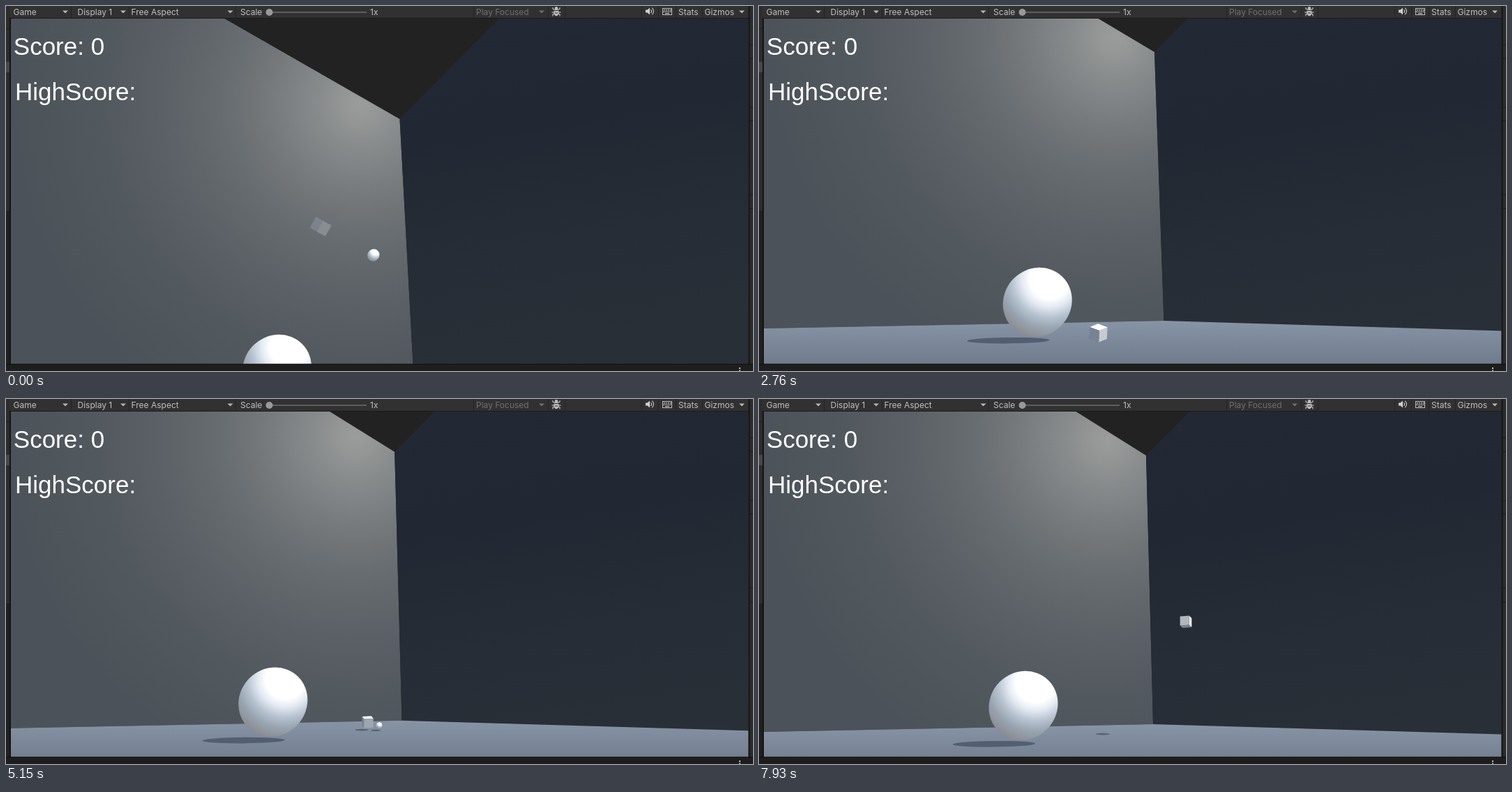
An HTML page with a canvas that plays this animation: 1071 by 523 pixels, repeating every 8 s.

```html
<!DOCTYPE html>
<html lang="en">
<head>
<meta charset="utf-8">
<title>Game view</title>
<style>
  html, body { margin: 0; width: 100%; height: 100%; overflow: hidden; background: #191919; }
  canvas { display: block; }
</style>
</head>
<body>
<canvas id="view" width="1071" height="523"></canvas>
<script>
const g = document.getElementById('view').getContext('2d');
const LOOP = 8000, TAU = Math.PI * 2;
const LEFT = 7, TOP = 18, RIGHT = 1064.5, BOTTOM = 512.5;

// Moments when the game stands still: start, length
const pauses = [[2360, 400], [4350, 730], [6960, 200]];

// Cube path in game time: t, x, y
const path = [
  [0, 451, 316], [850, 525, 357], [1650, 496, 505], [2070, 491, 509], [2360, 486.5, 468.5],
  [3160, 515.5, 471], [3950, 515.5, 471], [4790, 552, 375.3], [5830, 583, 246], [6600, 612, 319.3]
];

// Pickups in game time: appear, vanish, x, y, radius
const pickups = [
  [0, 850, 526.8, 357, 8.8],
  [2900, 4120, 534.8, 467.8, 4.6],
  [4120, 5900, 582.8, 235.8, 7.3]
];

const ramp = (t, a, b) => Math.min(1, Math.max(0, (t - a) / (b - a)));
const gameTime = t => t - pauses.reduce((sum, [start, len]) => sum + len * ramp(t, start, start + len), 0);

function along(points, t) {
  const i = points.findIndex(p => p[0] > t);
  const [a, b] = i < 0 ? points.slice(-2) : points.slice(i - 1, i + 1);
  const f = ramp(t, a[0], b[0]);
  return [a[1] + (b[1] - a[1]) * f, a[2] + (b[2] - a[2]) * f];
}

// The room follows from the upper corner, which moves with the camera
function roomAt(t) {
  const lift = ramp(t, 1650, 2360), drift = ramp(t, 2360, 3160), settle = ramp(t, 3950, 4470);
  const x = 564.5 + 2.5 * lift + 4 * Math.sin(Math.PI * lift) - 9.5 * drift - 2.5 * settle;
  const y = 162 - 96 * lift + 9 * drift + 6 * settle;
  const pan = x - 555, tilt = y - 81, depth = y - TOP;
  return {
    x, y,
    left: x - depth * (1.54 + 0.0009 * depth + 0.008 * pan),
    right: x + depth * 0.99,
    floorX: x + 10 + 0.09 * tilt + 0.4 * pan,
    floorY: y + 385 + 0.06 * Math.max(0, tilt),
    ballX: x - 176 + 0.6 * pan - 0.07 * tilt,
    ballY: y + 358.3
  };
}

function poly(fill, ...pts) {
  g.fillStyle = fill;
  g.beginPath();
  pts.forEach(p => g.lineTo(p[0], p[1]));
  g.closePath();
  g.fill();
}

function rect(fill, x, y, w, h) {
  g.fillStyle = fill;
  g.fillRect(x, y, w, h);
}

function ellipse(fill, x, y, rx, ry = rx, turn = 0) {
  g.fillStyle = fill;
  g.beginPath();
  g.ellipse(x, y, rx, ry, turn, 0, TAU);
  g.fill();
}

function text(s, x, y, color = '#c0c0c0', font = '12px Inter, Roboto, sans-serif') {
  g.font = font;
  g.fillStyle = color;
  g.fillText(s, x, y);
}

function stops(grad, ...list) {
  list.forEach(([p, c]) => grad.addColorStop(p, c));
  return grad;
}

function ball(x, y, r) {
  const hx = x + r * 0.35, hy = y - r * 0.65;
  const shade = stops(g.createRadialGradient(hx, hy, 0, hx, hy, r * 1.75),
    [0.32, '#ffffff'], [0.45, '#e4ebf3'], [0.62, '#b8c3d1'], [0.8, '#98a3b0'], [1, '#8a8c90']);
  ellipse(shade, x, y, r * 1.02, r * 0.96, -Math.PI / 4);
}

function cube(x, y, size, yaw, pitch, roll) {
  const [sy, cy, sp, cp, sr, cr] = [yaw, pitch, roll].flatMap(a => [Math.sin(a), Math.cos(a)]);
  const turn = ([a, b, c]) => {
    const x1 = a * cy + c * sy, z1 = c * cy - a * sy;
    const y2 = b * cp - z1 * sp, z2 = b * sp + z1 * cp;
    return [x1 * cr + y2 * sr, y2 * cr - x1 * sr, z2];
  };
  for (let axis = 0; axis < 3; axis++) for (const side of [-1, 1]) {
    const place = (a, b) => {
      const p = [];
      p[axis] = side;
      p[(axis + 1) % 3] = a;
      p[(axis + 2) % 3] = b;
      return turn(p);
    };
    const n = place(0, 0);
    if (n[2] <= 0.001) continue;
    const corners = [[-1, -1], [1, -1], [1, 1], [-1, 1]].map(([a, b]) => {
      const q = place(a, b);
      return [x + q[0] * size / 2, y - q[1] * size / 2];
    });
    const light = Math.min(1, Math.max(0, 0.3 + n[0] * 0.6 + n[1] * 0.8 + n[2] * 0.08));
    const mix = a => Math.round(a + (255 - a) * light);
    poly(`rgb(${mix(120)},${mix(131)},${mix(145)})`, ...corners);
  }
}

// Floor shadow of something floating at x, y
function dropShadow(x, y, half, horizon) {
  const sx = x + 0.77 * y - 365;
  const sy = Math.max(horizon + 15 - (sx - 476) * 0.05, Math.min(y + 7, 478));
  ellipse('#566172', sx, sy, half, 1.3);
}

function drawRoom(t) {
  const { x, y, left, right, floorX, floorY, ballX, ballY } = roomAt(t);
  const corner = [x, y], foot = [floorX, floorY];
  const floorL = [LEFT, floorY + 11], floorR = [RIGHT, floorY + 14.5];
  g.save();
  g.beginPath();
  g.rect(LEFT, TOP, RIGHT - LEFT, BOTTOM - TOP);
  g.clip();
  rect('#222222', LEFT, TOP, RIGHT, BOTTOM);

  const glow = g.createRadialGradient(x - 55, y - 22, 0, x - 55, y - 22, 500);
  for (let p = 0; p <= 1; p += 1 / 16) {
    const k = Math.exp(-2.7 * p ** 1.15);
    glow.addColorStop(p, `rgb(${70 + 85 * k},${77 + 80 * k},${84 + 72 * k})`);
  }
  poly(glow, [LEFT, TOP], [left, TOP], corner, foot, floorL);

  const dim = stops(g.createLinearGradient(600, TOP, 680, BOTTOM),
    [0, '#222834'], [0.35, '#222833'], [0.7, '#262d36'], [1, '#282f37']);
  poly(dim, [right, TOP], [RIGHT, TOP], floorR, foot, corner);

  const ground = stops(g.createLinearGradient(0, floorY, 0, floorY + 62), [0, '#8794a6'], [1, '#707c8c']);
  poly(ground, floorL, foot, floorR, [RIGHT, 600], [LEFT, 600]);

  const [cx, cy] = along(path, t);
  const live = pickups.filter(p => t >= p[0] && t < p[1]);
  if (t > 2300) {
    dropShadow(cx, cy, 10, floorY);
    live.forEach(p => dropShadow(p[2], p[3], 7, floorY));
  }
  ellipse('#535f70', ballX - 42, ballY + 55, 59, 4.3, -0.01);
  ball(ballX, ballY, 50);
  live.forEach(p => ball(p[2], p[3], p[4]));

  g.globalAlpha = 0.4 + 0.6 * ramp(t, 0, 600);
  cube(cx, cy, 18 - 4.5 * ramp(t, 2360, 3160),
    0.7 * Math.cos(t / 800), 0.4 * Math.sin(t / 1700), 0.5 * Math.exp(-t / 1000));
  g.globalAlpha = 1;

  const big = '35px "Liberation Sans", Arial, sans-serif';
  text('Score: 0', 10.8, 70, '#fff', big);
  text('HighScore:', 13, 135, '#fff', big);
  g.restore();
}

function drawPointer(t) {
  if (t < 150 || t >= 1650) return;
  const f = ramp(t, 150, 820), x = 947 - 162 * f, y = 474 - 112 * f;
  const shape = [[0, 0], [0, 15.5], [3.5, 12.3], [6, 18], [8.2, 17], [5.8, 11.5], [10.5, 11.3]];
  poly('#fff', ...shape.map(p => [x + p[0], y + p[1]]));
  g.strokeStyle = '#111';
  g.lineWidth = 0.8;
  g.stroke();
}

function arrow(x, color = '#b5b5b5') {
  poly(color, [x - 4, 6.5], [x + 4, 6.5], [x, 10.5]);
}

function line(...pts) {
  g.beginPath();
  pts.forEach(p => g.lineTo(p[0], p[1]));
  g.stroke();
}

function drawIcons() {
  g.strokeStyle = '#bdbdbd';
  g.lineWidth = 1.2;
  // bug
  for (const s of [-1, 1]) {
    line([789, 7], [789 + s * 5, 4], [789 + s * 5, 2]);
    line([789, 9], [789 + s * 6.5, 9]);
    line([789, 10], [789 + s * 5, 12], [789 + s * 5, 14.5]);
  }
  ellipse('#bdbdbd', 789, 9, 3.6, 5.2);
  ellipse('#bdbdbd', 789, 3.5, 2.4);
  rect('#313131', 786, 6, 6, 1);
  rect('#313131', 787, 9.5, 4, 1);
  // speaker
  poly('#d0d0d0', [917, 5.5], [919.5, 5.5], [923, 2.5], [923, 12.5], [919.5, 9.5], [917, 9.5]);
  for (const r of [3, 6]) {
    g.beginPath();
    g.arc(922.5, 7.5, r, -0.9, 0.9);
    g.stroke();
  }
  // keyboard
  g.lineWidth = 1;
  g.strokeRect(941.5, 3.5, 13, 9);
  for (let row = 0; row < 2; row++)
    for (let i = 0; i < 4; i++) rect('#bdbdbd', 943 + i * 3 - row * 0.5, 5 + row * 2.5, 1.8, 1.5);
  rect('#bdbdbd', 945, 10, 6, 1.3);
}

function drawFrame() {
  rect('#2c2c2c', 0, 0, 1071, 523);
  rect('#313131', 5, 0, 1060, 17);
  rect('#1b1b1b', 5, 17, 1061, 1);
  for (const x of [93, 176, 329, 670, 777, 801, 911, 935, 960, 998]) rect('#242424', x, 0, 1, 17);
  rect('#474747', 0, 80, 5, 15);
  rect('#1d1d1d', 0, 32, 5, 1);
  rect('#202020', 0, 293, 5, 230);
  rect('#151515', 5, 17, 2, 497);
  rect('#151515', 1064.5, 0, 2, 514);
  for (const y of [55, 75, 145, 164, 270, 290]) rect('#1a1a1a', 1066, y, 5, 1);
  rect('#121212', 0, 512.5, 1071, 2);
  rect('#1e1e1e', 0, 514.5, 1071, 9);
  for (const y of [518, 521.5]) rect('#c4c4c4', 1051, y, 2, 2);

  text('Game', 10.5, 12.5);
  text('Display 1', 102.5, 12.5);
  text('Free Aspect', 179.5, 12.5);
  text('Scale', 336, 12.5);
  text('1x', 522, 12.5);
  text('Play Focused', 674, 12.5, '#707070');
  text('Stats', 964, 12.5);
  text('Gizmos', 1001.5, 12.5);
  [85, 168, 321.5, 1055].forEach(x => arrow(x));
  arrow(768, '#707070');
  rect('#5e5e5e', 377, 8, 140, 2);
  ellipse('#999999', 377.5, 9, 5);
  drawIcons();
}

function draw(now) {
  const t = now % LOOP;
  drawFrame();
  drawRoom(gameTime(t));
  drawPointer(t);
  requestAnimationFrame(draw);
}
requestAnimationFrame(draw);
</script>
</body>
</html>
```
